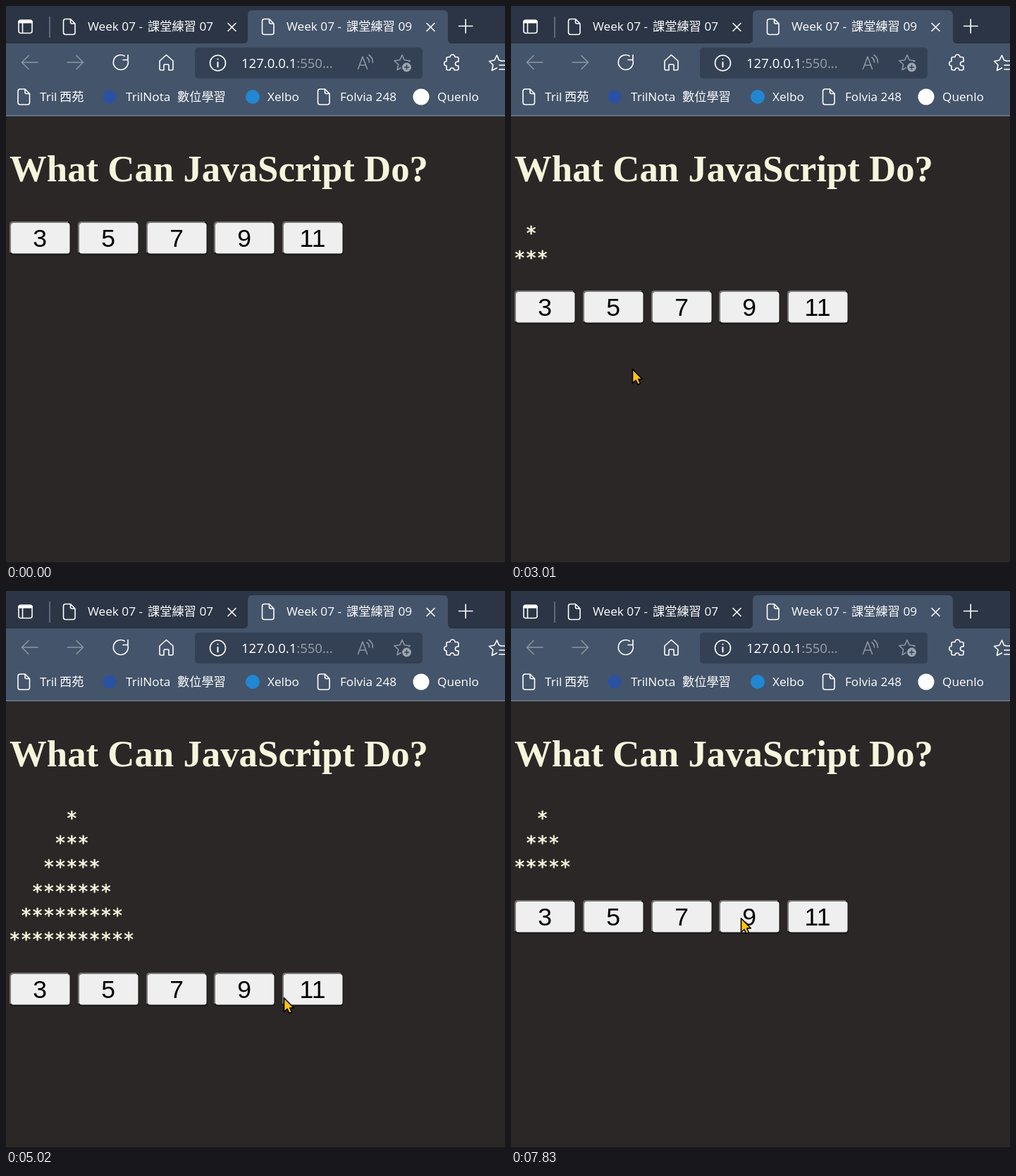
Write an HTML page that moves like this. It is 708 px wide and 791 px high and loops after 8 s.

```html
<!DOCTYPE html>
<html lang="zh-Hant">
<head>
<meta charset="utf-8">
<title>What Can JavaScript Do?</title>
<style>
html, body { margin: 0; width: 100%; height: 100%; overflow: hidden; background: #2b2727; }
svg { display: block; }
.ui { font: 17.2px "Open Sans", "Noto Sans", sans-serif; fill: #fff; }
.cjk { font-family: "Noto Sans CJK TC", "Noto Sans CJK", sans-serif; font-size: 17.2px; font-weight: 300; }
.url { font-size: 18.5px; }
.line { fill: none; stroke: #fff; stroke-width: 1.6; stroke-linecap: round; stroke-linejoin: round; }
.dim { stroke: #8b96a5; }
.title { font: bold 52.8px "Liberation Serif", "Times New Roman", serif; fill: #f5f5dc; }
.stars { font: 26.9px "DejaVu Sans Mono", monospace; fill: #f5f5dc; stroke: #f5f5dc; stroke-width: .7; }
.label { font: 35.5px "Liberation Sans", Arial, sans-serif; text-anchor: middle; }
</style>
</head>
<body>
<svg width="708" height="791" viewBox="0 0 708 791">
  <defs>
    <path id="file" d="M3 0H10L16.5 6.5V19a3 3 0 0 1-3 3H3a3 3 0 0 1-3-3V3a3 3 0 0 1 3-3ZM10 0V4.5a2 2 0 0 0 2 2H16.5"/>
    <path id="close" d="M0 0L11 11M11 0L0 11"/>
    <path id="star" d="M0-11.5L3.3-4.2 11.2-3.3 5.300 2 7 9.700 0 5.800-7 9.700-5.300 2-11.200-3.300-3.300-4.200Z"/>
    <g id="button">
      <rect width="87" height="48" rx="5" fill="#1c1a1a"/>
      <path d="M1 44V5q0-4 4-4H83" fill="none" stroke="#767676" stroke-width="2"/>
      <rect x="2" y="2" width="83.500" height="43.500" rx="3.500" fill="#efefef"/>
    </g>
  </defs>

  <rect width="708" height="791" fill="#2b2727"/>
  <rect y="790" width="708" height="1" fill="#191616"/>

  <!-- tab strip -->
  <rect width="708" height="53" fill="#2b3545"/>
  <rect y="52" width="708" height="1" fill="#242d3b"/>
  <path d="M337 53q6 0 6-6V13q0-7 7-7H620q7 0 7 7V47q0 6 6 6Z" fill="#44546a"/>
  <rect y="53" width="708" height="103" fill="#44546a"/>
  <rect y="155" width="708" height="1.500" fill="#738093"/>
  <path d="M62 15V45" stroke="#717b89" stroke-width="1.500"/>
  <g class="line">
    <rect x="18" y="20" width="19" height="18.500" rx="3"/>
    <path d="M19 22.500H36" stroke-width="4"/>
    <path d="M23.500 24V38M642.500 28.500H662M652.200 19V38.500"/>
  </g>
  <g id="tabs"></g>

  <!-- toolbar -->
  <rect x="268" y="59" width="323" height="44" rx="5" fill="#344154"/>
  <g class="line">
    <path class="dim" d="M45 80H22.500M32 70.500L22.500 80 32 89.500M87 80H109.500M100 70.500L109.500 80 100 89.500"/>
    <path d="M172.500 76a10.500 10.500 0 1 1-4.300-5M173 69.500V76.500H166"/>
    <path d="M218 78L227.500 69.500 237 78V89.500q0 1.500-1.500 1.500H231V84q0-1-1-1H225q-1 0-1 1V91H219.500q-1.500 0-1.500-1.500Z"/>
    <circle cx="300.500" cy="81" r="11"/>
    <path d="M300.500 80V86.500M300.500 75.500V75.600" stroke-width="2"/>
    <path class="dim" d="M499.500 89.500L506 72 512.500 89.500M501.700 84H510.300M512 73q3.500 2.500 3.500 7M515 69.500q5.500 4 5.500 11"/>
    <use class="dim" href="#star" x="562" y="81"/>
    <path d="M627 72.500H630a3.500 3.500 0 0 1 7 0H640q2 0 2 2V79H640.500a3 3 0 0 0 0 6H642V89q0 2-2 2H636a3 3 0 0 0-6 0H627q-2 0-2-2V85a3.200 3.200 0 0 1 0-6.500V74.500q0-2 2-2Z"/>
    <path d="M702 77.500L699.500 77 696.500 70 693 77 685.500 78.500 691 83.500 689.500 91.500 696.500 88M702 78H708M700 84H708M700 90H708"/>
  </g>
  <circle cx="568.500" cy="87" r="7.200" fill="#9da5b0" stroke="#344154" stroke-width="1.500"/>
  <path d="M565 87H572M568.500 83.500V90.500" stroke="#344154" stroke-width="1.500"/>
  <text class="ui url" x="334" y="87.500">127.0.0.1<tspan fill="#98a1ae">:550...</tspan></text>

  <!-- bookmarks -->
  <g class="line">
    <use href="#file" x="17" y="118"/>
    <use href="#file" x="442.500" y="118"/>
  </g>
  <circle cx="147" cy="129" r="9.500" fill="#2a52a3"/>
  <circle cx="350" cy="129" r="10" fill="#2187d2"/>
  <circle cx="589" cy="129" r="11.500" fill="#fff"/>
  <g class="ui">
    <text y="135" x="48">Tril<tspan class="cjk" x="76">西苑</tspan></text>
    <text y="135" x="170">TrilNota<tspan class="cjk" x="243">數位學習</tspan></text>
    <text y="135" x="371">Xelbo</text>
    <text y="135" x="474">Folvia 248</text>
    <text y="135" x="612">Quenlo</text>
  </g>

  <!-- page -->
  <text class="title" x="5" y="249">What Can JavaScript Do?</text>
  <g id="stars" class="stars"></g>
  <g id="buttons"></g>
  <path id="cursor" d="M.5 .8V20.500L5 16.600 8 22.600 11.500 21 8.800 15H14.300Z" fill="#ffc20e" stroke="#000" stroke-width="1.600" stroke-linejoin="round"/>
</svg>
<script>
const LOOP = 8000, START = 575, STEP = 201; // ms; the screen refreshes once per STEP
const TOP = 306, ROW = 34.4, CHAR = 16.2;

// Turning points of the pointer: step, x, y and the button pressed there.
const path = [
  [0, 545, 768], [4, 87, 391], [7, 57, 336, 3],
  [10, 135, 736], [12, 172, 515], [15, 162, 440, 5],
  [16, 155, 522], [18, 172, 652], [21, 425, 466, 11],
  [22, 394, 577], [24, 310, 692], [27, 237, 580, 7],
  [30, 166, 650], [33, 148, 497, 5], [35, 323, 475], [36, 326, 464]
];

const byId = id => document.getElementById(id);
const stars = byId("stars"), buttons = byId("buttons"), cursor = byId("cursor");
const range = (n, make) => Array.from({ length: n }, (_, i) => make(i)).join("");
const ease = u => u * u * (3 - 2 * u);

byId("tabs").innerHTML = range(2, i => `
  <g transform="translate(${282 * i} 0)">
    <g class="line"><use href="#file" x="81.5" y="18.5"/><use href="#close" x="315" y="24.5"/></g>
    <text class="ui" x="116" y="35">Week 07 -<tspan class="cjk" x="201">課堂練習</tspan><tspan x="274.5">0${7 + 2 * i}</tspan></text>
  </g>`);

buttons.innerHTML = range(5, i => `
  <g transform="translate(${Math.round(5 + 96.75 * i)} ${TOP})">
    <use href="#button"/><text class="label" x="43" y="36">${3 + 2 * i}</text>
  </g>`);

function pointerAt(step) {
  const next = path.findIndex(p => p[0] >= step);
  const b = path[next], a = path[next - 1] || b;
  const u = ease((step - a[0]) / (b[0] - a[0] || 1));
  return [1, 2].map(k => Math.round(a[k] + (b[k] - a[k]) * u));
}

function showTriangle(base) {
  const rows = (base + 1) >> 1;
  stars.innerHTML = range(base && rows, i =>
    `<text x="${4.2 + CHAR * (rows - 1 - i)}" y="${332.4 + ROW * i}">${"*".repeat(2 * i + 1)}</text>`);
  const drop = base ? Math.round(29.3 + ROW * rows) : 0;
  buttons.setAttribute("transform", `translate(0 ${drop})`);
}

let shown;
function draw() {
  const step = Math.floor((performance.now() % LOOP - START) / STEP);
  if (step !== shown) {
    shown = step;
    const press = path.findLast(p => p[3] && p[0] <= step);
    showTriangle(press ? press[3] : 0);
    cursor.setAttribute("visibility", step < 0 ? "hidden" : "visible");
    if (step >= 0) cursor.setAttribute("transform", `translate(${pointerAt(step)})`);
  }
  requestAnimationFrame(draw);
}
draw();
</script>
</body>
</html>
```
